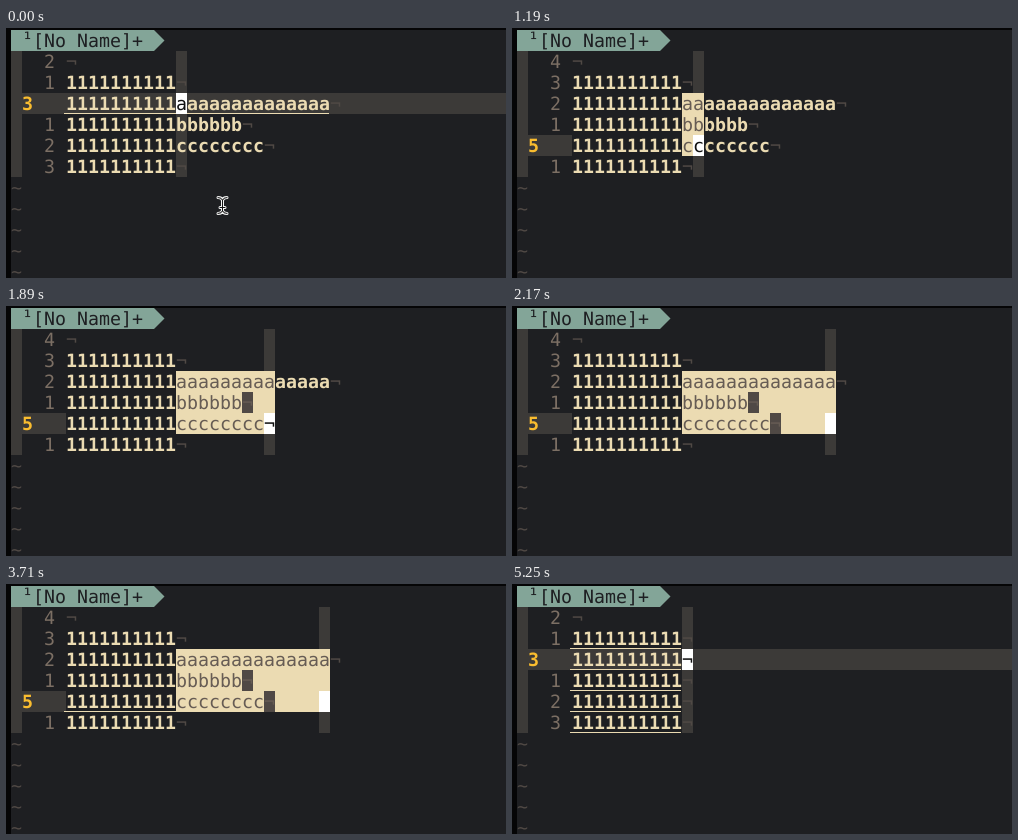
An HTML page that plays this animation: 500x250 px, repeating every 5.81 s.

```html
<!DOCTYPE html>
<html lang="en">
<head>
<meta charset="utf-8">
<title>Visual block delete</title>
<style>
  html, body { margin: 0; width: 100%; height: 100%; overflow: hidden; background: #050506; }
  svg { display: block; width: 500px; height: 250px; }
  text {
    font-family: "DejaVu Sans Mono", monospace;
    font-size: 18.27px;
    white-space: pre;
    text-rendering: geometricPrecision;
  }
</style>
</head>
<body>
<svg id="stage" viewBox="0 0 500 250"></svg>
<script>
const LOOP = 5810, TICK = 70;
const CW = 11, RH = 21, TOP = 2, LEFT = 60;
const C = {
  bg: '#1e1f22', line: '#3c3a38', fg: '#ebdbb2', dim: '#504945',
  num: '#7c6f64', now: '#fabd2f', sel: '#665c54', tab: '#83a598'
};
const ONES = '1'.repeat(10);
const FULL = ['', ONES, ONES + 'a'.repeat(14), ONES + 'b'.repeat(6), ONES + 'c'.repeat(8), ONES];
const CUT = ['', ONES, ONES, ONES, ONES, ONES];

const colX = c => LEFT + c * CW;
const rowY = r => TOP + r * RH;
const rect = (x, y, w, h, fill) =>
  `<rect x="${x}" y="${y}" width="${w}" height="${h}" fill="${fill}"/>`;
const label = (s, x, r, fill, weight = 400, dy = 0) =>
  s && `<text x="${x}" y="${rowY(r) + 17 + dy}" fill="${fill}" font-weight="${weight}">${s}</text>`;
const cells = (r, from, to, fill) =>
  rect(colX(from), rowY(r), (to - from) * CW, RH, fill);

// Rows count from 1 below the tab bar; under lists the rows with an underlined word.
function stateAt(t) {
  if (t < 140) return { lines: FULL, row: 3, col: 10, visual: false, under: [3], mouse: true };
  if (t < 560) return { lines: FULL, row: 3, col: 10, visual: true, under: [3] };
  if (t < 1120) return { lines: FULL, row: 4, col: 10, visual: true, under: t < 980 ? [] : [4] };
  if (t < 5110) {
    const repeat = Math.floor(13.1 + (t - 1540) / 60);
    const col = t < 1190 ? 10 : Math.min(23, Math.max(11, repeat));
    return { lines: FULL, row: 5, col, visual: true, under: t < 2520 ? [] : [5] };
  }
  return { lines: CUT, row: 3, col: 10, visual: false, under: t < 5250 ? [] : [2, 3, 4, 5, 6] };
}

function tabBar() {
  return `<path d="M5 2H148L158.5 12.5L148 23H5Z" fill="${C.tab}"/>` +
    label('¹', 16, 0, C.bg, 400, -2) + label('[No Name]+', 27, 0, C.bg);
}

function lineRow(s, r) {
  const text = s.lines[r - 1], end = text.length, here = r === s.row;
  const picked = s.visual && r >= 3 && r <= s.row;
  const from = picked ? 10 : end, to = picked ? s.col + 1 : end;
  let out = here
    ? label(r, 16, r, C.now, 700)
    : label(Math.abs(r - s.row), 38, r, C.num);

  if (s.under.includes(r)) out += rect(58, rowY(r + 1) - 1, end * CW + 1, 1, C.fg);
  out += label(text.slice(0, from), LEFT, r, C.fg, 700);
  out += label(text.slice(to), colX(to), r, C.fg, 700);
  if (picked) {
    out += cells(r, from, to, C.fg);
    out += label(text.slice(from, to), colX(from), r, C.sel);
  }
  const eolPicked = picked && to > end;
  if (eolPicked) out += cells(r, end, end + 1, C.dim);
  out += label('¬', colX(end), r, eolPicked ? C.sel : C.dim);
  if (here) {
    out += cells(r, s.col, s.col + 1, '#fff');
    out += label((text + '¬')[s.col] || '', colX(s.col), r, '#111');
  }
  return out;
}

function pointer() {
  const d = 'M212 169.5Q216 169.5 216.5 172.5Q217 169.5 221 169.5M216.5 172V183' +
    'M212 185.5Q216 185.5 216.5 182.5Q217 185.5 221 185.5M214 179.5H219';
  return `<g fill="none" stroke-linecap="round"><path d="${d}" stroke="#f4f4f4" stroke-width="3"/>` +
    `<path d="${d}" stroke="#111" stroke-width="1"/></g>`;
}

function draw(s) {
  let out = rect(5, 2, 495, 248, C.bg) + tabBar();
  out += rect(5, rowY(1), 11, RH * 6, C.line);
  out += rect(colX(s.col), rowY(1), CW, RH * 6, C.line);
  out += rect(5, rowY(s.row), s.visual ? 55 : 495, RH, C.line);
  for (let r = 1; r <= 6; r++) out += lineRow(s, r);
  for (let r = 7; r <= 11; r++) out += label('~', 5, r, C.dim);
  return out + (s.mouse ? pointer() : '');
}

const stage = document.getElementById('stage');
const start = performance.now();
let shown = -1;

function frame() {
  const t = (performance.now() - start) % LOOP;
  const step = Math.floor(t / TICK);
  if (step !== shown) {
    shown = step;
    stage.innerHTML = draw(stateAt(step * TICK));
  }
  requestAnimationFrame(frame);
}
frame();
</script>
</body>
</html>
```
